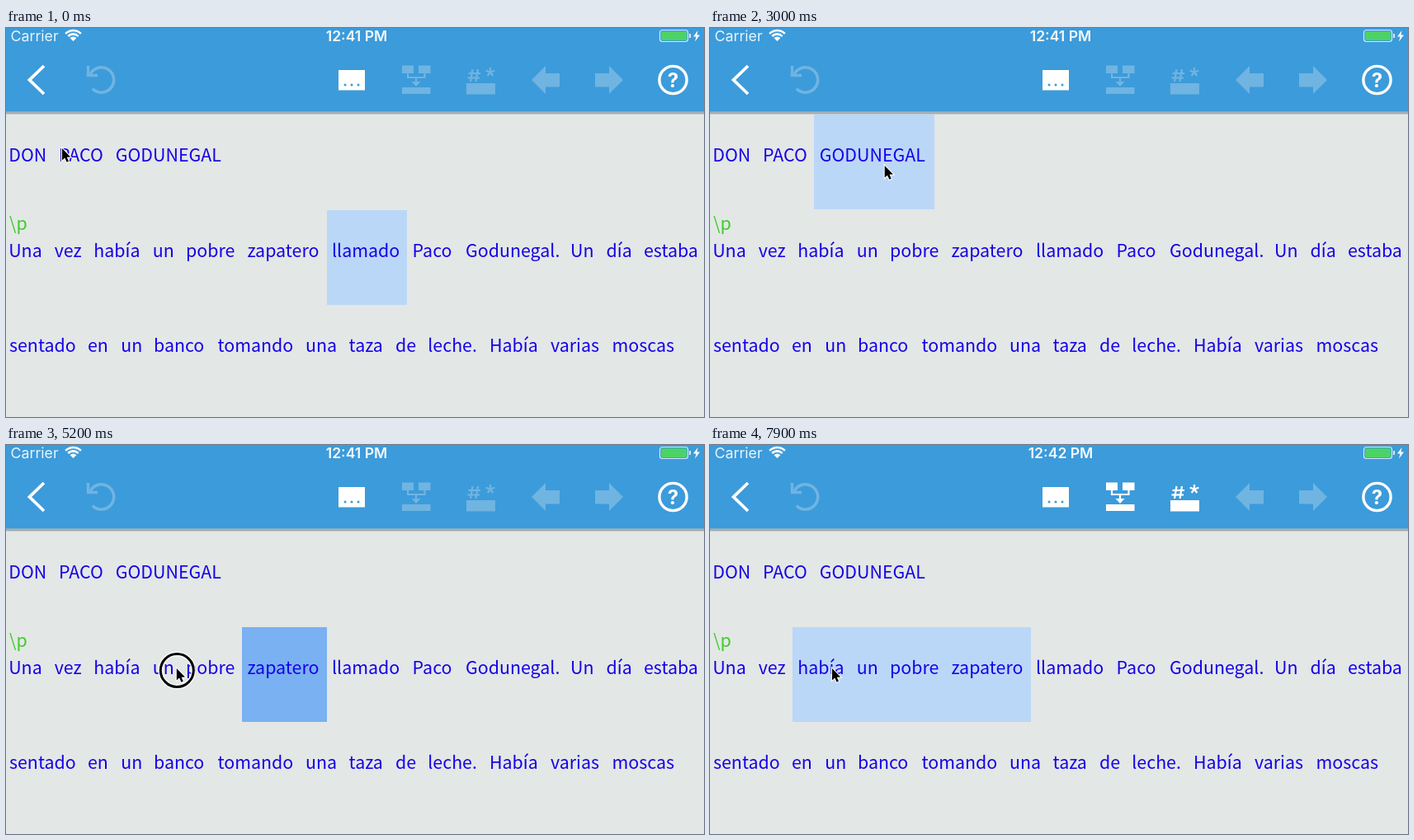
Animation, 846 px wide and 472 px high, one loop 8 s. Source, as an HTML page with a canvas:

```html
<!DOCTYPE html>
<html lang="es">
<head>
<meta charset="utf-8">
<title>Text selection</title>
<style>
html, body { margin: 0; width: 846px; height: 472px; overflow: hidden; background: #e3e7e6; }
canvas { display: block; }
</style>
</head>
<body>
<canvas id="stage" width="846" height="472"></canvas>
<script>
const ctx = document.getElementById('stage').getContext('2d');
const LOOP = 8000;
const BLUE = '#3c9bda', FADED = '#70b4e2', WHITE = '#fff';
const LIGHT = '#bbd7f8', DARK = '#79b1f2', INK = '#1600e6';
const READ = '21.4px "Noto Sans CJK SC", "Noto Sans CJK JP", "Noto Sans CJK", "Noto Sans", sans-serif';
const UI = 'Inter, Roboto, sans-serif';

const lines = [
  [162, 'DON PACO GODUNEGAL', [3.2, 64, 132.7]],
  [278, 'Una vez había un pobre zapatero llamado Paco Godunegal. Un día estaba',
    [3.2, 58.7, 106.3, 177.7, 218, 292.5, 395, 492.6, 557, 684, 727.5, 773]],
  [393, 'sentado en un banco tomando una taza de leche. Había varias moscas',
    [4, 99, 139.3, 179, 256.5, 363, 415.6, 472, 511.3, 586, 660, 734.5]]
];

// time, x, y of the pointer tip
const path = [[0, 68, 146], [250, 72, 147], [1200, 194, 154], [2900, 194, 154],
  [3750, 343, 264], [4650, 343, 266], [5200, 207, 271], [5500, 148, 271], [LOOP, 148, 271]];

// start, left, right, top, colour of the selected block
const marks = [[0, 389, 486, 221, LIGHT], [2000, 126, 272, 105, DARK], [2700, 126, 272, 105, LIGHT],
  [4500, 286, 389, 221, DARK], [5300, 212, 389, 221, DARK], [5400, 171, 389, 221, DARK],
  [5500, 100, 389, 221, DARK], [6700, 100, 389, 221, LIGHT]];

function rect(x, y, w, h, color) {
  ctx.fillStyle = color;
  ctx.fillRect(x, y, w, h);
}

function trace(points, closed) {
  ctx.beginPath();
  points.forEach(([x, y]) => ctx.lineTo(x, y));
  if (closed) ctx.closePath();
}

function poly(points, color) {
  trace(points, true);
  ctx.fillStyle = color;
  ctx.fill();
}

function line(points, width, color) {
  trace(points);
  stroke(width, color);
}

function stroke(width, color) {
  ctx.lineWidth = width;
  ctx.strokeStyle = color;
  ctx.stroke();
}

function arc(x, y, r, from, to, width, color) {
  ctx.beginPath();
  ctx.arc(x, y, r, from, to);
  stroke(width, color);
}

function dot(x, y, r, color) {
  ctx.beginPath();
  ctx.arc(x, y, r, 0, 7);
  ctx.fillStyle = color;
  ctx.fill();
}

function text(str, x, y, font, color, align = 'left') {
  ctx.font = font;
  ctx.fillStyle = color;
  ctx.textAlign = align;
  ctx.fillText(str, x, y);
}

function statusBar(clock) {
  text('Carrier', 5.5, 16, '17.8px ' + UI, '#eaf4fb');
  text(clock, 425, 16, '600 17.6px ' + UI, '#f4f9fd', 'center');

  const up = -Math.PI / 2, half = 0.8;
  [13, 8.6].forEach(r => arc(81.5, 16, r, up - half, up + half, 2.6, WHITE));
  ctx.beginPath();
  ctx.moveTo(81.5, 16);
  ctx.arc(81.5, 16, 5.4, up - half, up + half);
  ctx.fillStyle = WHITE;
  ctx.fill();

  ctx.beginPath();
  ctx.roundRect(792.5, 2.5, 34, 14, 3);
  stroke(1.2, '#d5e9f6');
  ctx.beginPath();
  ctx.roundRect(794, 4, 31, 11, 1.8);
  ctx.fillStyle = '#4cd267';
  ctx.fill();
  rect(828, 7, 2, 5, '#d5e9f6');
  poly([[838.5, 3], [833, 10.5], [836.5, 10.5], [835, 16.5], [841, 8.5], [837.5, 8.5]], WHITE);
}

function blockArrow(tip, dir) {
  const at = (d, y) => [tip + dir * d, y];
  poly([at(0, 63), at(17, 46), at(17, 55), at(34, 55), at(34, 71.5), at(17, 71.5), at(17, 80)], FADED);
}

function mergeIcon(c) {
  rect(480, 45.5, 14, 9.5, c);
  rect(500, 45.5, 14.5, 9.5, c);
  line([[487, 54], [487, 60], [507.5, 60], [507.5, 54]], 2.2, c);
  line([[497, 60], [497, 67]], 2.2, c);
  poly([[491.5, 65], [502.5, 65], [497, 71]], c);
  rect(480, 72, 34.5, 8, c);
}

function markIcon(c) {
  line([[565.5, 50], [563, 65]], 2.2, c);
  line([[572, 50], [569.5, 65]], 2.2, c);
  line([[560.5, 55], [575, 55]], 2.2, c);
  line([[559.5, 60.5], [574, 60.5]], 2.2, c);
  for (let i = 0; i < 5; i++) {
    const a = -Math.PI / 2 + i * Math.PI * 0.4;
    line([[587, 53.5], [587 + 5.6 * Math.cos(a), 53.5 + 5.6 * Math.sin(a)]], 2.3, c);
  }
  rect(558, 67, 35, 13.5, c);
}

function toolbar(active) {
  const c = active ? WHITE : FADED;
  line([[46, 46], [28.5, 63], [46, 80]], 3.8, WHITE);

  arc(115.5, 63, 15.2, -2.65, 2.35, 3.6, FADED);
  line([[99.5, 46], [99.5, 57.5], [111, 57.5]], 3.4, FADED);

  rect(403, 51, 32, 24.5, WHITE);
  [411, 419, 427].forEach(x => dot(x, 69, 1.5, BLUE));

  mergeIcon(c);
  markIcon(c);
  blockArrow(637, 1);
  blockArrow(748, -1);

  arc(808.5, 63, 16.6, 0, 7, 3.4, WHITE);
  text('?', 808.5, 71.5, '700 24px ' + UI, WHITE, 'center');
}

function pointerAt(t) {
  const i = path.findIndex(p => p[0] > t);
  const [t0, x0, y0] = path[i - 1], [t1, x1, y1] = path[i];
  const k = (t - t0) / (t1 - t0);
  return [x0 + (x1 - x0) * k, y0 + (y1 - y0) * k];
}

function pointer(x, y, pressed) {
  if (pressed) {
    arc(x + 0.5, y + 2.5, 20, 0, 7, 6, 'rgba(255,255,255,.8)');
    arc(x + 0.5, y + 2.5, 20, 0, 7, 3, '#000');
  }
  const shape = [[0, 0], [0, 14.5], [3.3, 11.6], [5.6, 16.8], [8, 15.8], [5.8, 10.7], [10.2, 10.5]]
    .map(([a, b]) => [x + a, y + b]);
  trace(shape, true);
  stroke(2, WHITE);
  poly(shape, '#000');
}

function draw(t) {
  rect(0, 0, 846, 472, '#e3e7e6');
  rect(0, 0, 846, 101, BLUE);
  rect(0, 101, 846, 1, '#7cabc9');
  rect(0, 102, 846, 1, '#a9b6bc');
  rect(0, 103, 846, 1, '#a0a5a6');
  rect(0, 104, 846, 1, '#c9cdcc');

  const [, left, right, top, color] = marks.filter(m => m[0] <= t).pop();
  rect(left, top, right - left, 115, color);

  text('\\p', 4, 245, READ, '#3fcb2b');
  lines.forEach(([y, words, xs]) =>
    words.split(' ').forEach((word, i) => text(word, xs[i], y, READ, INK)));

  statusBar(t < 7600 ? '12:41 PM' : '12:42 PM');
  toolbar(t >= 6700);
  pointer(...pointerAt(t), t >= 4300 && t < 6200);
}

const start = performance.now();
function tick() {
  draw((performance.now() - start) % LOOP);
  requestAnimationFrame(tick);
}
tick();
</script>
</body>
</html>
```
